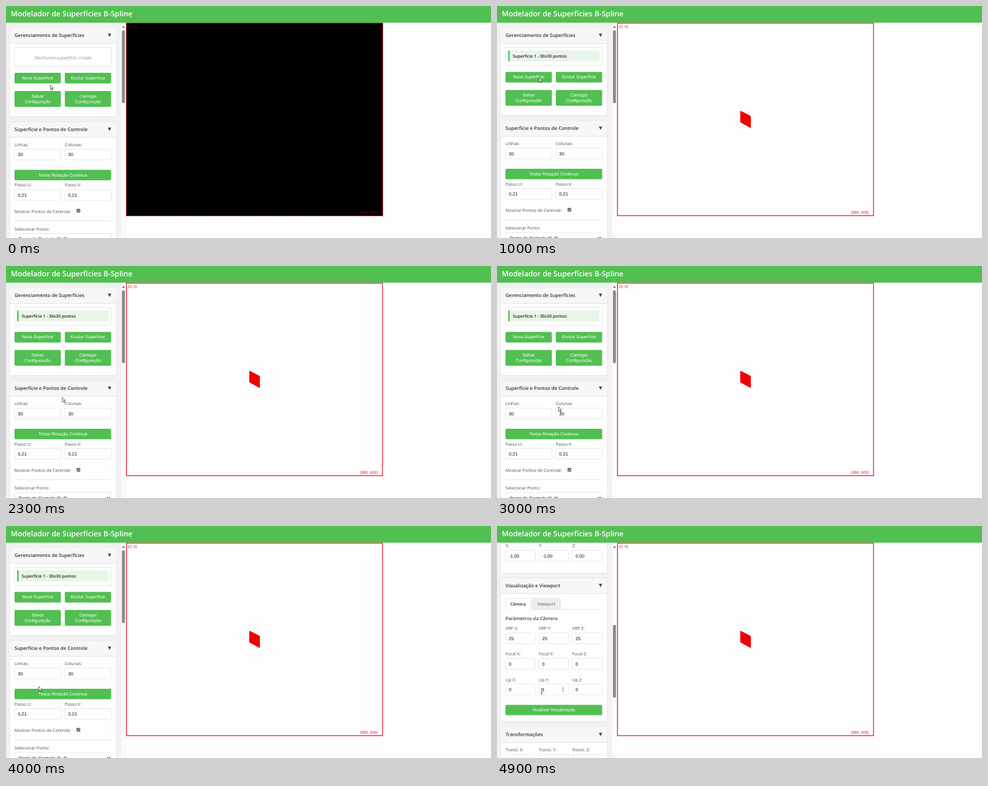
Write an HTML page that moves like this. It is 800 px wide and 382 px high and loops after 5000 ms.

```html
<!DOCTYPE html>
<html lang="pt">
<head>
<meta charset="utf-8">
<title>Modelador de Superfícies B-Spline</title>
<style>
  html, body { margin: 0; height: 100%; overflow: hidden; background: #fefefe; }
  #stage { display: block; width: 100vw; height: 100vh; }
  text { font-family: "Open Sans", "Noto Sans", sans-serif; text-rendering: geometricPrecision; white-space: pre; }
  .title { font-size: 12.2px; font-weight: 600; fill: #fff; }
  .head { font-size: 7.98px; font-weight: 600; fill: #333; }
  .sub { font-size: 7.75px; font-weight: 600; fill: #444; }
  .label { font-size: 7.08px; font-weight: 500; fill: #505050; }
  .item { font-size: 6.9px; font-weight: 600; fill: #222; }
  .tab { font-size: 6.8px; font-weight: 600; fill: #222; }
  .tab2 { font-size: 7px; fill: #555; }
  .none { font-size: 7.9px; font-style: italic; fill: #999; text-anchor: middle; }
  .value, .btn, .coord { font-family: "Liberation Sans", Arial, sans-serif; }
  .value { font-size: 7.5px; fill: #111; }
  .btn { font-size: 7.28px; fill: #fff; text-anchor: middle; }
  .coord { font-size: 6.5px; }
  .green { fill: #52bf52; }
  .box { fill: #fefefe; stroke: #e2e2e2; stroke-width: .8; }
  .bar { fill: #f7f7f7; }
  .line { fill: none; stroke: #dedede; stroke-width: .8; }
  .hover { fill: #46a749; }
</style>
</head>
<body>
<svg id="stage" viewBox="0 0 800 382" preserveAspectRatio="none"></svg>
<script>
const rect = (x, y, w, h, cls, extra = '') =>
  `<rect x="${x}" y="${y}" width="${w}" height="${h}" class="${cls}" ${extra}/>`;
const text = (x, y, cls, str, extra = '') => `<text x="${x}" y="${y}" class="${cls}" ${extra}>${str}</text>`;
const path = (d, extra) => `<path d="${d}" ${extra}/>`;
const group = (id, ...parts) => `<g id="${id}">${parts.join('')}</g>`;

const card = (y, h, title, id = '') =>
  rect(6, y + .6, 176, h, '', 'rx="3" fill="#e4e4e4"') +
  rect(6, y, 176, h, 'box', 'rx="2.5"') +
  rect(6.4, y + .4, 175.2, 25, 'bar', `rx="2" id="${id}"`) +
  path(`M6 ${y + 25.5}h176`, 'class="line"') +
  text(14, y + 15.3, 'head', title) +
  path(`M168 ${y + 9.6}h5.6l-2.8 5.4z`, 'fill="#444"');

const button = (x, y, w, h, lines, id = '') =>
  rect(x, y, w, h, 'green', `rx="1.8" id="${id}"`) +
  lines.map((s, i) => text(x + w / 2, y + h / 2 + 2.3 + (i - (lines.length - 1) / 2) * 8.6, 'btn', s)).join('');

const field = (x, y, w, label, value) =>
  text(x, y, 'label', label) +
  rect(x, y + 4.7, w, 17.7, 'box', 'rx="1.8"') +
  text(x + 5.5, y + 16.2, 'value', value);

const pair = (y, a, b, value) => field(14, y, 76.5, a, value) + field(97, y, 76.5, b, value);
const xyz = (y, name, values) =>
  values.map((v, i) => field(14 + 55 * i, y, 49.3, name + 'XYZ'[i] + ':', v)).join('');

const empty = group('empty',
  card(36, 146, 'Gerenciamento de Superfícies'),
  rect(14, 68.3, 159.5, 31.5, 'box', 'rx="1.8"'),
  text(94, 87.5, 'none', 'Nenhuma superfície criada'));

const filled = group('filled',
  card(36, 144.3, 'Gerenciamento de Superfícies'),
  rect(14, 68.3, 159.5, 29.5, 'box', 'rx="1.8"'),
  rect(18.4, 73, 150.6, 18.3, '', 'rx="1.5" fill="#e8f5e8"'),
  rect(18.4, 73, 2.4, 18.3, 'green', 'rx="1"'),
  text(26, 85, 'item', 'Superfície 1 - 30x30 pontos'));

const rest = group('rest',
  button(14, 108.4, 76.5, 17.5, ['Nova Superfície'], 'create'),
  button(97, 108.4, 76.5, 17.5, ['Excluir Superfície']),
  button(14, 138.3, 76.5, 26, ['Salvar', 'Configuração']),
  button(97, 138.3, 76.5, 26, ['Carregar', 'Configuração']),

  card(189, 258.5, 'Superfície e Pontos de Controle', 'points'),
  pair(229.3, 'Linhas:', 'Colunas:', '30'),
  button(14, 268, 159.5, 17.2, ['Testar Rotação Contínua']),
  pair(295.8, 'Passo U:', 'Passo V:', '0,21'),
  text(14, 339, 'label', 'Mostrar Pontos de Controle:'),
  rect(116.4, 332.4, 6, 6, '', 'rx="1" fill="#606060"'),
  path('M117.7 335.5l1.3 1.4 2.2-3', 'fill="none" stroke="#fff" stroke-width=".9"'),
  path('M14 351.9h159.5', 'class="line"'),
  text(14, 368.1, 'label', 'Selecionar Ponto:'),
  rect(14, 372.8, 159.5, 18, 'box', 'rx="1.8"'),
  text(21, 384.5, 'value', 'Ponto de Controle (0, 0)'),
  path('M167 380.7l2.2 2.2 2.2-2.2', 'fill="none" stroke="#222" stroke-width="1.1"'),
  xyz(405.3, '', ['-1,00', '-1,00', '0,00']),

  card(455.5, 236, 'Visualização e Viewport'),
  path('M14 507.5h159.5', 'class="line"'),
  path('M14 507.5v-17q0-1.5 1.5-1.5h38.5q1.5 0 1.5 1.5v17', 'fill="#fefefe" stroke="#dedede" stroke-width=".8"'),
  rect(58.5, 489, 46, 18.4, '', 'rx="1.5" fill="#eee" stroke="#dedede" stroke-width=".8"'),
  text(22, 501.2, 'tab', 'Câmera'),
  text(67, 501.2, 'tab2', 'Viewport'),
  text(14, 525.2, 'sub', 'Parâmetros da Câmera'),
  xyz(541.2, 'VRP ', [25, 25, 25]),
  xyz(583.3, 'Focal ', [0, 0, 0]),
  xyz(625.4, 'Up ', [0, 1, 0]),
  group('spin', path('M107 637.6l1.8-2.4 1.8 2.4zM107 640l1.8 2.4 1.8-2.4z', 'fill="#777"')),
  button(14, 664.3, 159.5, 17, ['Atualizar Visualização']),

  card(700.8, 200, 'Transformações'),
  xyz(741.2, 'Transl. ', [0, 0, 0]));

const sidebar = `<svg x="0" y="27.5" width="198" height="354.5" viewBox="0 27.5 198 354.5">` +
  rect(0, 27, 190, 355, '', 'fill="#f3f2f3"') +
  rect(190, 27, 8, 355, '', 'fill="#fbfbfb"') +
  path('M191.2 36h5.2l-2.6-3.8z', 'fill="#858585"') +
  rect(191.2, 40, 5, 120, '', 'id="thumb" rx="2.5" fill="#8b8b8b"') +
  group('scroll', empty, filled, rest) + '</svg>';

const view = rect(198, 27.5, 424, 318.5, '', 'id="screen"') +
  rect(198.7, 28.2, 422.4, 317, '', 'id="frame" fill="none" stroke-width="1.3"') +
  group('coords', text(201, 36, 'coord', '(0, 0)'), text(584, 342.3, 'coord', '(890, 600)')) +
  path('M402 173.5L418 181.7V199.9L402 191z',
    'id="surface" fill="#ee0000" stroke="#ee0000" stroke-width="1.5" stroke-linejoin="round"');

const ink = 'fill="#fff" stroke="#333" stroke-width=".75" stroke-linejoin="round"';
const cursor = group('cursor',
  group('arrow', path('M0 0V7.4L1.8 5.8 3 8.6 4.2 8.1 3 5.3H5.4z', ink)),
  group('hand', path('M-.8 .8Q0-.6 .8 .8V3.8L3.6 4.5Q4.4 4.8 4.2 6L3.5 9.4H-.6L-2.8 6.2Q-2.6 5-.8 6z', ink)),
  group('beam', path('M-1.6-3.8h3.2M0-3.8v7.6M-1.6 3.8h3.2', 'fill="none" stroke="#333" stroke-width=".8"')));

const $ = id => document.getElementById(id);
$('stage').innerHTML = rect(0, 0, 800, 382, '', 'fill="#fefefe"') + view + sidebar +
  rect(0, 0, 800, 27.5, 'green') +
  text(8, 16.8, 'title', 'Modelador de Superfícies B-Spline') + cursor;

// time, x, y of the pointer tip
const pointer = [[0, 73, 130], [400, 69.5, 118], [1000, 69.5, 118], [1600, 88, 207.5], [1900, 88, 207.5],
  [3000, 101.6, 232], [3400, 101.6, 232], [4000, 54.3, 264.5], [4200, 69.3, 263.8], [4500, 73.7, 272], [5000, 73.7, 272]];
const wheel = [[0, 0], [4000, 0], [4100, 150], [4200, 312.5], [4300, 358], [4400, 369.8], [5000, 369.8]];

function at(keys, t) {
  const i = keys.findIndex(k => k[0] > t), a = keys[i - 1], b = keys[i];
  const p = (t - a[0]) / (b[0] - a[0]);
  return a.slice(1).map((v, n) => v + (b[n + 1] - v) * p);
}
const show = (id, on) => $(id).style.display = on ? '' : 'none';
const set = (id, attrs) => Object.entries(attrs).forEach(([k, v]) => $(id).setAttribute(k, v));

function draw(now) {
  const t = Math.floor(now % 5000 / 100) * 100;
  const made = t >= 1000, [x, y] = at(pointer, t), [top] = at(wheel, t);
  const onButton = y < 126 && !made, onHead = made && y > 189 && y < 214.5, onInput = t >= 4400;

  show('empty', !made);
  show('filled', made);
  show('surface', made);
  show('spin', onInput);
  show('hand', onButton || onHead);
  show('beam', onInput);
  show('arrow', !onButton && !onHead && !onInput);

  set('rest', { transform: `translate(0 ${made ? 0 : 1.7})` });
  set('scroll', { transform: `translate(0 ${-top})` });
  set('thumb', { y: 40 + top / 3.01 });
  set('cursor', { transform: `translate(${x} ${y})` });
  set('screen', { fill: made ? '#fefefe' : '#000' });
  set('frame', { stroke: made ? '#e5162c' : '#c4141c', 'stroke-dasharray': made ? 'none' : '1.5 .5' });
  set('coords', { fill: made ? '#e5162c' : '#8a0000' });
  set('create', { class: onButton ? 'hover' : 'green' });
  $('points').style.fill = onHead ? '#ececec' : '';
  requestAnimationFrame(draw);
}
const start = performance.now();
requestAnimationFrame(() => draw(performance.now() - start));
</script>
</body>
</html>
```
